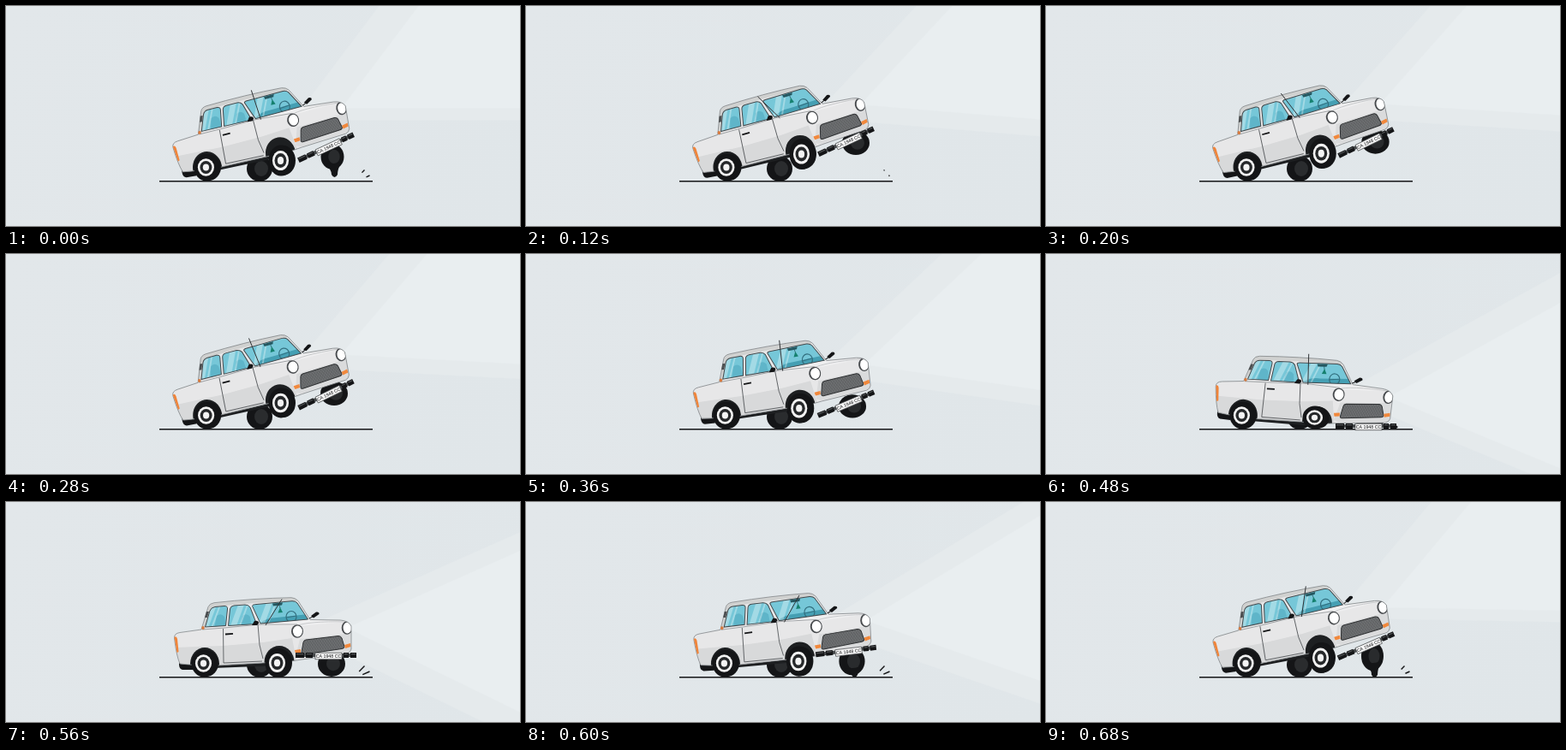
Animation, 600 px wide and 257 px high, one loop 720 ms. Source, as an HTML page with a canvas:

```html
<!DOCTYPE html>
<html lang="en">
<head>
<meta charset="utf-8">
<title>Bouncing car</title>
<style>
html, body { margin: 0; width: 100%; height: 100%; overflow: hidden; background: #e1e6e9; }
canvas { display: block; width: 600px; height: 257px; }
</style>
</head>
<body>
<canvas id="stage" width="600" height="257"></canvas>
<script>
const ctx = document.getElementById('stage').getContext('2d');
const LOOP = 720, STEP = 40, INK = '#141517', TAU = Math.PI * 2;
const PIVOT = { x: 233, y: 171 };
const rad = deg => deg * Math.PI / 180;

// Poses at these times, joined by a periodic cubic curve
const times = [0, 120, 280, 400, 480, 560, 680];
const tracks = {
  tilt: [-9.7, -11.3, -10.4, -3, 7, 0, -8.4],
  beamTop: [-53, -47, -49.5, -39, -28.8, -24, -50],
  beamBottom: [0, 4.7, 3, 12, 22.5, 26, 1],
  antenna: [-18, -46, -22, 0, 1.5, 32, 8],
  bumperY: [165, 158, 164, 182, 201, 179, 168],
  bumperTilt: [-25, -25, -26, -19, 0, 0, -23.5],
  wheelX: [321, 322, 321, 318, 314, 317, 321],
  wheelY: [180.5, 173, 174, 184, 191, 188, 182],
  wheelRy: [18, 18, 17.5, 17, 13.5, 17, 18],
  farX: [381, 385, 383, 380, 378, 380, 381],
  farY: [176, 160, 163, 186, 196, 189, 180],
  farRx: [13.5, 16, 16, 16, 16, 16, 13],
  farRy: [15, 14, 14, 13, 9, 15, 17]
};

function sample(values, t) {
  const n = times.length;
  const time = i => times[(i + n) % n] + LOOP * Math.floor(i / n);
  const value = i => values[(i + n) % n];
  const slope = i => (value(i + 1) - value(i - 1)) / (time(i + 1) - time(i - 1));
  let i = n - 1;
  while (times[i] > t) i--;
  const span = time(i + 1) - time(i), u = (t - time(i)) / span, v = 1 - u;
  return value(i) * v * v * (1 + 2 * u) + value(i + 1) * u * u * (3 - 2 * u)
    + span * u * v * (slope(i) * v - slope(i + 1) * u);
}

function paint(shape, fill, stroke, width = 1) {
  const path = typeof shape === 'string' ? new Path2D(shape) : shape;
  if (fill) { ctx.fillStyle = fill; ctx.fill(path); }
  if (stroke) { ctx.strokeStyle = stroke; ctx.lineWidth = width; ctx.stroke(path); }
}

function oval(x, y, rx, ry, fill, stroke, width) {
  const path = new Path2D();
  path.ellipse(x, y, rx, ry, 0, 0, TAU);
  paint(path, fill, stroke, width);
}

function line(x1, y1, x2, y2, color = INK, width = 1) {
  paint(`M${x1} ${y1}L${x2} ${y2}`, null, color, width);
}

function clipped(shape, draw) {
  ctx.save();
  ctx.clip(new Path2D(shape));
  draw();
  ctx.restore();
}

function onBody(x, y, tilt) {
  const c = Math.cos(rad(tilt)), s = Math.sin(rad(tilt));
  const dx = x - PIVOT.x, dy = y - PIVOT.y;
  return [PIVOT.x + dx * c - dy * s, PIVOT.y + dx * s + dy * c];
}

function drawBackground(pose) {
  const sky = ctx.createLinearGradient(0, 0, 600, 257);
  sky.addColorStop(0, '#e2e7ea');
  sky.addColorStop(1, '#e0e6e9');
  ctx.fillStyle = sky;
  ctx.fillRect(0, 0, 600, 257);

  const ray = ([x, y], deg) => `${x + 700 * Math.cos(rad(deg))} ${y + 700 * Math.sin(rad(deg))}`;
  const beam = (lamp, color) =>
    paint(`M${lamp}L${ray(lamp, pose.beamTop)}L1200 0L${ray(lamp, pose.beamBottom)}Z`, color);
  beam(onBody(340, 151, pose.tilt), '#e5eaec');
  beam(onBody(398, 147, pose.tilt), '#e9eef0');
}

function drawWheel(x, y, rx, ry) {
  oval(x + 2.5, y, rx, ry - .5, INK);
  oval(x, y, rx, ry, INK);
  oval(x - .5, y, rx * .66, ry * .64, '#f2f2f2');
  oval(x - .5, y, rx * .48, ry * .47, '#26282a');
  oval(x - .5, y, rx * .25, ry * .25, '#f4f4f4');
}

function drawFarWheels(pose, t) {
  oval(296, 190, 15, 15, INK);
  oval(298, 190, 8, 9, '#2a2c2e');
  const { farX: x, farY: y, farRx: rx, farRy: ry } = pose;
  oval(x, y, rx, ry, INK);
  oval(x + 2, y, rx * .5, ry * .55, '#292b2d');
  // The tyre sticks to the ground and stretches before it lets go
  const age = (t - 600 + LOOP) % LOOP;
  if (age < 180) {
    const end = age < 120 ? 204 : 199 - (age - 120) * .2;
    paint(`M${x - 8} ${y + 9}Q380 ${y + 15} 380 ${end - 2}Q383.5 ${end + 4} 387 ${end - 2}Q387 ${y + 15} ${x + 10} ${y + 7}Z`, INK);
  }
}

function drawWindows() {
  const panes = [
    'M232.5 146L238 127Q239.5 123 244 122.5L255 121.5Q259 121.5 258.5 125L256.5 144.5Z',
    'M259.5 144.5L261.5 125Q262 121.5 266 121L279 120Q283 120 285 123L292.5 142.5Z',
    'M287.5 121.5Q287.5 120 290.5 119.7L334 115.7Q338 115.7 340 118L352.5 137L297 142Z'
  ];
  panes.forEach((pane, i) => {
    clipped(pane, () => {
      ctx.fillStyle = '#76c7d8';
      ctx.fillRect(225, 105, 135, 45);
      if (i === 2) {
        paint('M294 144Q302 135 316 135L354 131L354 144Z', '#459fb3');
        oval(333, 134, 6, 6.5, null, '#326f7f', 1.2);
        line(327, 135, 339, 133, '#326f7f');
      } else {
        const x = i ? 273 : 243;
        paint(`M${x} 148L${x + 3} 133Q${x + 8} 129 ${x + 12} 134L${x + 14} 148Z`, '#5fb5c9');
      }
      const glare = [242, 274, 306][i];
      paint(`M${glare} 112L${glare + 7} 112L${glare - 7} 150L${glare - 14} 150Z`, 'rgba(255,255,255,.33)');
      paint(`M${glare + 10} 112L${glare + 12} 112L${glare - 2} 150L${glare - 4} 150Z`, 'rgba(255,255,255,.33)');
    });
    paint(pane, null, '#44494c', 1);
  });
  paint('M311 118.5L323 117.5L322 120.5L312 121.5Z', '#245760');
  line(319, 120, 320, 124, '#245760', .7);
  paint('M320 123L323 129L317.5 129.5Z', '#16816f');
}

function drawFront() {
  paint('M343 160L396 154L404 151L405 175L344 183L338 181Z', '#dadbdc');
  paint('M338 145Q352 139 397 140', null, '#bfc1c3', .8);

  const grill = 'M350 161L388 156.5Q391 156.5 392 159L395 169Q395 171 392 171.5L347 178Q344.5 178 345 175.5L347 164Q347.5 161.5 350 161Z';
  paint(grill, '#6f7173');
  clipped(grill, () => {
    for (let x = 325; x < 410; x += 3) {
      line(x, 154, x + 18, 180, '#57595b', .6);
      line(x + 18, 154, x, 180, '#5d5f61', .5);
    }
  });
  paint(grill, null, '#303234', 1);

  for (const [x, y, rx] of [[340, 151, 7], [398, 147, 6.3]]) {
    oval(x, y, rx, 7.8, '#484b4e');
    oval(x + .4, y, rx - 1.5, 6.4, '#ffffff');
  }
  paint('M337 173L344 172L344 176L338 177Z', '#f1883c');
  paint('M395 167L402 165L402.5 169L396 171Z', '#f1883c');
}

function drawBody(pose) {
  ctx.save();
  ctx.translate(PIVOT.x, PIVOT.y);
  ctx.rotate(rad(pose.tilt));
  ctx.translate(-PIVOT.x, -PIVOT.y);

  paint('M202 186L218 188L218 196L206 196Q202 195 202 190Z', INK);
  paint('M240 186L306 184L306 191.5L242 194Z', '#1d1f21');

  const shell = 'M196.5 159Q196 153.5 203 152.5L228 149L236 122.5Q237.5 118.5 243 117.7Q290 112.5 333 111.7Q338 112 341 115.5L355 137.5'
    + 'L390 138Q400 138.5 403 145L403 172Q402 176 398 177L345 184L333 186L300 188L246 191L214 190L203 189Q199 180 196.5 159Z';
  paint(shell, '#e7e7e8');
  clipped(shell, () => {
    paint('M194 170L253 168L300 164L334 159L340 190L200 196Z', '#d8d9da');
    paint('M228 149L236 121Q239 117 244 116L333 110L341 115L338 116Q290 117 246 122L239 124L232 149Z', '#d0d1d0');
    paint('M298 143L355 137L397 140L340 145Z', '#efeff0');
    drawFront();
    oval(232, 189, 17, 19, '#1d1f21');
    oval(319, 187, 17.5, 19, '#1d1f21');
  });
  paint(shell, null, '#85898c', .8);

  drawWindows();
  paint('M229 149L255 147L297 143L340 143', null, '#85898c', .7);
  paint('M253.5 148L254 188L299 186', null, '#5a5d60', .9);
  paint('M294 143L296 167L300 183', null, '#5a5d60', .9);
  line(256, 154.5, 265, 153.8, INK, 1.8);
  paint('M196.5 158Q199 156 200 160L201.5 175L199.5 176Z', '#ef843a');
  oval(230, 147, 1.7, 2, '#d8793d');
  paint('M234 128L237 128L235 135L232 135Z', '#4b4e50');
  paint('M287 144L290 139Q295 138 295 141.5L293 144Z', INK);

  const mirror = 'M356 133L362 128.5Q366 128 365.5 131L359 135.5Z';
  paint(mirror, INK);
  line(354, 136, 358, 134);
  ctx.restore();

  const [x, y] = onBody(303, 144, pose.tilt);
  const a = rad(pose.antenna);
  line(x, y, x + 36 * Math.sin(a), y - 36 * Math.cos(a), '#303235', 1);
}

function drawBumper(pose) {
  ctx.save();
  ctx.translate(374, pose.bumperY);
  ctx.rotate(rad(pose.bumperTilt));
  ctx.fillStyle = '#46494b';
  ctx.fillRect(-31, -2, 62, 4);
  for (const [x, w] of [[-36, 10], [-24, 8], [20, 6], [28, 7]]) {
    ctx.fillStyle = INK;
    ctx.fillRect(x, -3, w, 6);
    ctx.fillStyle = '#505355';
    ctx.fillRect(x + 1, -2, w - 2, 1.2);
  }
  ctx.translate(2.5, 1);
  ctx.fillStyle = '#f6f6f6';
  ctx.fillRect(-15.5, -3.8, 31, 7.6);
  ctx.strokeStyle = '#45484a';
  ctx.lineWidth = .7;
  ctx.strokeRect(-15.5, -3.8, 31, 7.6);
  ctx.fillStyle = INK;
  ctx.font = '5.3px "Liberation Sans", Arial, sans-serif';
  ctx.textAlign = 'center';
  ctx.textBaseline = 'middle';
  ctx.fillText('CA 1948 CC', 0, .4);
  ctx.restore();
}

function drawSparks(t) {
  const age = (t - 480 + LOOP) % LOOP;
  if (age > 400) return;
  if (age < 40) {
    oval(409, 202, 1.6, 1.6, INK);
    return;
  }
  const size = Math.max(1.2, 9 - Math.max(0, age - 80) * .029);
  const reach = Math.min(1, age / 80);
  for (const [x, y, deg] of [[418.5, 191.5, -46], [424.5, 198, -24]]) {
    const hx = 409 + (x - 409) * reach, hy = 203 + (y - 203) * reach;
    line(hx - size * Math.cos(rad(deg)), hy - size * Math.sin(rad(deg)), hx, hy, INK, 1.4);
  }
}

function draw(t) {
  const pose = {};
  for (const name in tracks) pose[name] = sample(tracks[name], t);
  drawBackground(pose);
  line(179, 204.8, 428, 204.8, INK, 1.5);
  drawFarWheels(pose, t);
  drawBody(pose);
  drawWheel(231 - pose.tilt * .3, 188.5, 14.5, 16);
  drawWheel(pose.wheelX, pose.wheelY, 14.5, pose.wheelRy);
  drawBumper(pose);
  drawSparks(t);
}

function tick() {
  draw(Math.floor(performance.now() % LOOP / STEP) * STEP);
  requestAnimationFrame(tick);
}
tick();
</script>
</body>
</html>
```
